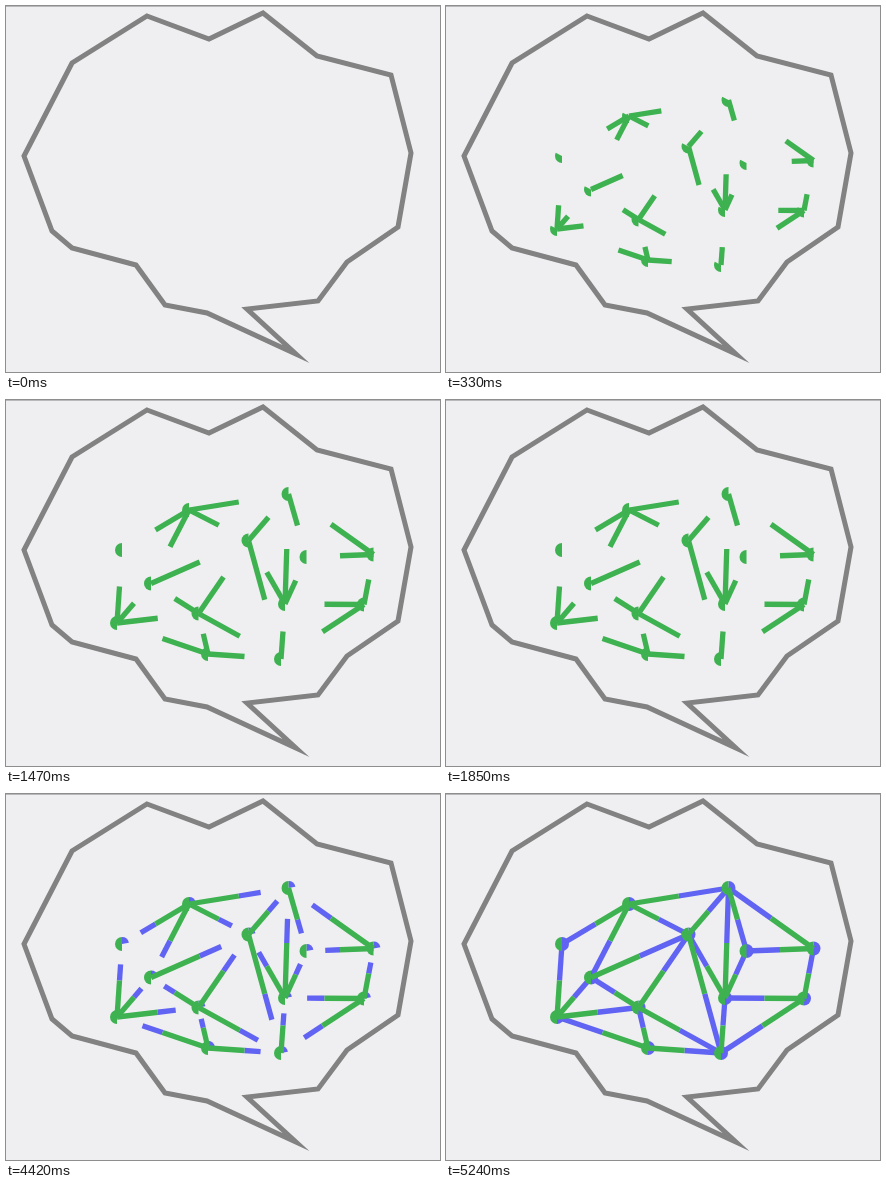
Write an HTML page with a canvas that moves like this. It is 434 px wide and 366 px high and loops after 5.39 s.

```html
<!DOCTYPE html>
<html>
<head>
<meta charset="utf-8">
<title>Network in a speech bubble</title>
<style>
html, body { margin: 0; width: 434px; height: 366px; overflow: hidden; background: #efeff1; }
canvas { display: block; }
</style>
</head>
<body>
<canvas id="stage" width="434" height="366"></canvas>
<script>
const ctx = document.getElementById('stage').getContext('2d');
const LOOP = 5390, STEP = 46, GROWTH = 0.06;
const GREEN = '#3eb250', BLUE = '#6163f3';

const bubble = new Path2D(`M141 10 L203 33 257 7 311 50 385 69 405 147 392 221 341 256
  312 295 241 303 290 348 201 307 159 299 130 259 66 242 46 225 18 150 66 57Z`);

// Position of each node and the nodes its edges grow towards.
const nodes = {
  A: [183, 110, 'BCFG'], B: [282.5, 94, 'D'], C: [242.5, 140.5, 'BM'],
  D: [300.5, 157, ''], E: [367.5, 154.5, 'BD'], F: [116, 150, ''],
  G: [145, 183.5, 'C'], H: [111, 223, 'FGI'], I: [192.5, 213.5, 'CGM'],
  J: [279, 204, 'BCD'], K: [358, 204.5, 'EJM'], L: [202, 254, 'HIM'],
  M: [275, 259, 'J']
};

// Each half of the drawing grows in hard steps up to one half.
function grow(time, first, initial) {
  if (time < first) return 0;
  return Math.min(0.5, initial + GROWTH * Math.floor((time - first) / STEP));
}

function drawBubble() {
  ctx.fillStyle = '#efeff1';
  ctx.fillRect(0, 0, 434, 366);
  ctx.fillStyle = '#b9b9bb';
  ctx.fillRect(0, 0, 434, 1);
  ctx.strokeStyle = '#828283';
  ctx.lineWidth = 5;
  ctx.miterLimit = 10;
  ctx.stroke(bubble);
}

function drawEdge([x1, y1], [x2, y2], start, end) {
  const at = p => [x1 + (x2 - x1) * p, y1 + (y2 - y1) * p];
  ctx.beginPath();
  ctx.moveTo(...at(start));
  ctx.lineTo(...at(end));
  ctx.stroke();
}

// Wedges run clockwise from the bottom of the disc.
function drawWedge([x, y], start, end) {
  const angle = p => Math.PI * (0.5 + 2 * p);
  ctx.beginPath();
  ctx.moveTo(x, y);
  ctx.arc(x, y, 7, angle(start), angle(end));
  ctx.fill();
}

function drawNetwork(color, start, length) {
  if (!length) return;
  ctx.strokeStyle = ctx.fillStyle = color;
  ctx.lineWidth = 5.3;
  for (const node of Object.values(nodes)) {
    drawWedge(node, start, start + length);
    for (const name of node[2]) drawEdge(node, nodes[name], start, start + length);
  }
}

function frame() {
  const time = performance.now() % LOOP;
  drawBubble();
  drawNetwork(BLUE, 0.5, grow(time, 4270, 0.04));
  drawNetwork(GREEN, 0, grow(time, 80, 0.025));
  requestAnimationFrame(frame);
}
frame();
</script>
</body>
</html>
```
